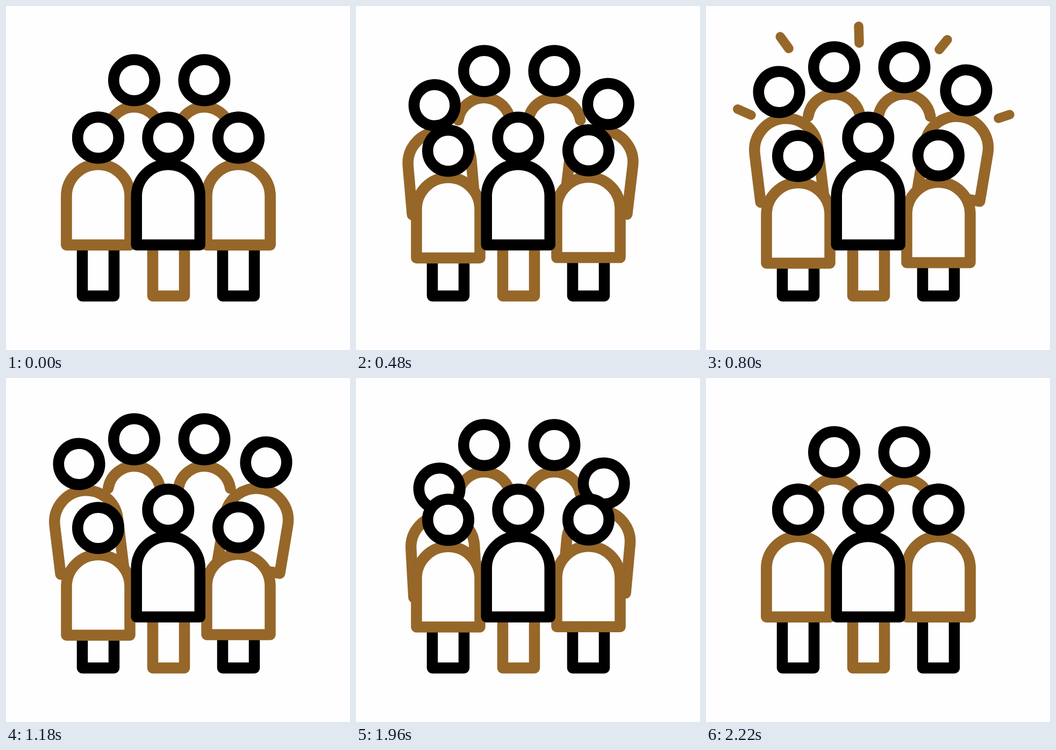
These frames come from a looping animation (640 px wide and 640 px high, 2560 ms). An HTML page with a canvas:

```html
<!DOCTYPE html>
<html lang="en">
<head>
<meta charset="utf-8">
<title>Growing group</title>
<style>
  html, body { margin: 0; width: 100%; height: 100%; overflow: hidden; background: #fefefe; }
  canvas { display: block; width: 640px; height: 640px; }
</style>
</head>
<body>
<canvas id="stage" width="640" height="640"></canvas>
<script>
const ctx = document.getElementById('stage').getContext('2d');
const LOOP = 2560, STEP = 20;
const BLACK = '#000', BROWN = '#966729', PAPER = '#fefefe';
const LINE = 20.5, RAY_LINE = 17.5;
const NECK = 109; // head centre to shoulder centre

// Each ray: inner end, then the full reach along x and y.
const RAYS = [
  [84, 203, -54, -24],
  [154, 79, -34, -47],
  [285, 69, -2, -67],
  [434, 81, 32, -39],
  [544, 209, 45, -15]
];

const mix = (a, b, p) => a + (b - a) * p;

function ease(t, start, duration) {
  const x = Math.min(1, Math.max(0, (t - start) / duration));
  return (1 - Math.cos(Math.PI * x)) / 2;
}

function stroke(color, width = LINE) {
  ctx.strokeStyle = color;
  ctx.lineWidth = width;
  ctx.stroke();
}

function fillPaper() {
  ctx.fillStyle = PAPER;
  ctx.fill();
}

function head(x, y, filled) {
  ctx.beginPath();
  ctx.arc(x, y, 38.25, 0, Math.PI * 2);
  if (filled) fillPaper();
  stroke(BLACK);
}

function body(x, y, color, filled) {
  ctx.beginPath();
  ctx.moveTo(x - 59, y + 90.5);
  ctx.lineTo(x - 59, y);
  ctx.arc(x, y, 59, Math.PI, 0);
  ctx.lineTo(x + 59, y + 90.5);
  ctx.closePath();
  if (filled) fillPaper();
  stroke(color);
}

function legs(x, color) {
  ctx.beginPath();
  ctx.moveTo(x - 29.5, 445);
  ctx.lineTo(x - 29.5, 539.5);
  ctx.lineTo(x + 29.5, 539.5);
  ctx.lineTo(x + 29.5, 445);
  stroke(color);
}

function backPerson(x, y) {
  ctx.beginPath();
  ctx.arc(x, y + 99, 49, Math.PI + 0.16, -0.16);
  stroke(BROWN);
  head(x, y, true);
}

function leaningPerson(x, y, degrees) {
  ctx.save();
  ctx.translate(x, y);
  ctx.rotate(degrees * Math.PI / 180);
  body(0, NECK, BROWN, false);
  head(0, 0, false);
  ctx.restore();
}

function frontPerson(x, y, color) {
  body(x, y + NECK, color, true);
  head(x, y, true);
}

function rays(t) {
  const tip = ease(t, 652, 309), tail = ease(t, 870, 309);
  if (tip <= 0 || tail >= 1) return;
  for (const [x, y, dx, dy] of RAYS) {
    ctx.beginPath();
    ctx.moveTo(x + dx * tail, y + dy * tail);
    ctx.lineTo(x + dx * tip, y + dy * tip);
    stroke(BROWN, RAY_LINE);
  }
}

function draw(t) {
  const rise = ease(t, 205, 430);
  const p = rise - ease(t, 1760, 430);
  const left = rise - ease(t, 1750, 400); // the left newcomer leaves a little sooner

  ctx.fillStyle = PAPER;
  ctx.fillRect(0, 0, 640, 640);
  ctx.lineCap = ctx.lineJoin = 'round';

  backPerson(238.5, mix(138, 114, p));
  backPerson(369, mix(138, 114, p));

  leaningPerson(mix(171.5, 136, left), mix(245, 160, left), -7 * left);
  leaningPerson(mix(432.5, 484, p), mix(245, 157, p), 9.5 * p);

  legs(171.5, BLACK);
  legs(302.5, BROWN);
  legs(432.5, BLACK);

  frontPerson(171.5, mix(245, 279, p), BROWN);
  frontPerson(432.5, mix(245, 278, p), BROWN);
  frontPerson(301.75, 245, BLACK);

  rays(t);
}

const start = performance.now();

function tick() {
  const t = (performance.now() - start) % LOOP;
  draw(Math.floor(t / STEP) * STEP);
  requestAnimationFrame(tick);
}
tick();
</script>
</body>
</html>
```
